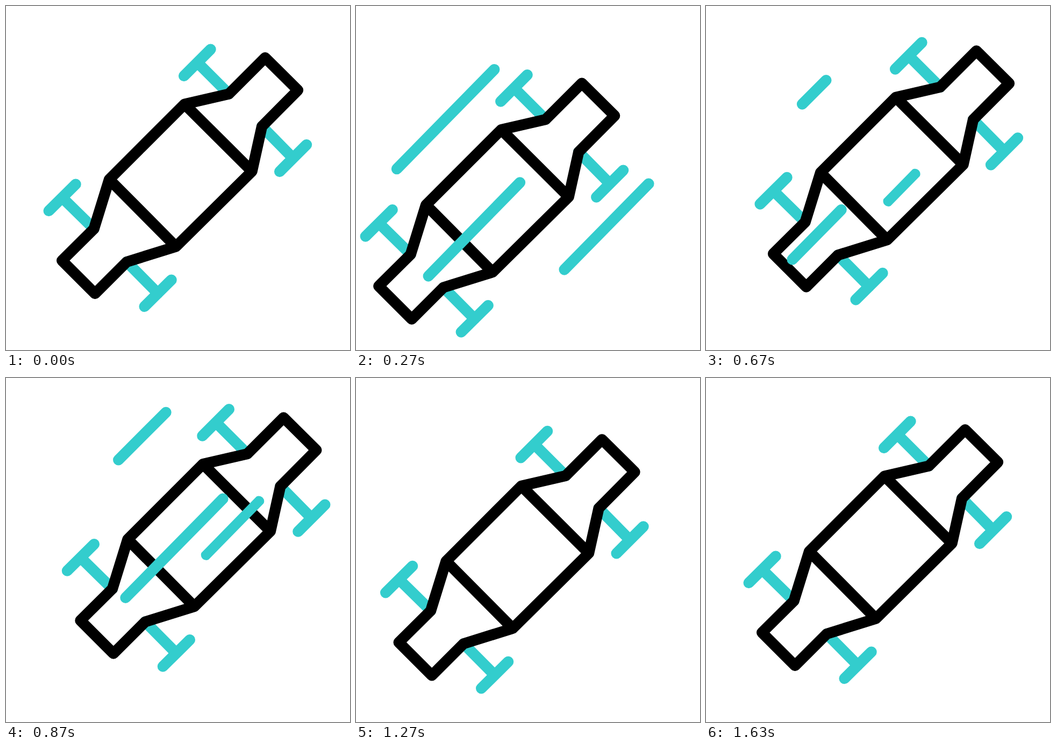
Recreate the animation shown at these times as an HTML page. Size 640 by 640 pixels, loop 1670 ms.

```html
<!DOCTYPE html>
<html lang="en">
<head>
<meta charset="utf-8">
<title>Racing car loop</title>
<style>
  html, body { margin: 0; width: 100%; height: 100%; overflow: hidden; background: #fff; }
  svg { display: block; width: 100%; height: 100%; }
  path, line { fill: none; stroke-width: 20.3; stroke-linecap: round; stroke-linejoin: round; }
  .teal, line { stroke: #33cdcd; }
  .black { stroke: #000; }
</style>
</head>
<body>
<svg viewBox="0.4 0.4 640 640">
  <defs>
    <clipPath id="band">
      <rect x="300" y="354" width="280" height="18.4" transform="rotate(-45.6 340 363.2)"/>
    </clipPath>
  </defs>
  <g id="car">
    <path class="teal" d="M381 81L331.5 130.5M356.5 105.5L415 164
      M559.5 258.5L509.5 308.5M534.5 283.5L476.5 224.5
      M130 332L80 381.5M105 357L164 415
      M308 510L258 559.5M283 535L225 476.5"/>
    <path class="black" d="M482.5 96.5L543.5 157L476.5 224.5L458 308L316.5 448L225 476.5
      L166 535.5L104.5 474L164 415L192.5 323L332.5 183L415 164Z
      M332.5 183L458 308M192.5 323L316.5 448"/>
  </g>
  <g id="streaks"></g>
</svg>
<script>
  const LOOP = 1670, STEP = 100 / 3;   // ms
  const car = document.getElementById('car');
  const layer = document.getElementById('streaks');

  // Car offset keys: [step, x, y]
  const carKeys = [
    [0, 0, 0], [9.1, -64.5, 49.5], [9.4, -64.5, 49.5],
    [23.7, 38, -25], [24.2, 38, -25], [36.5, -25.5, 19], [49, 0, 0]
  ];

  // The tip of a streak runs along its line first; the tail follows later.
  const RUN = 11.8, TAIL_DELAY = 7;
  const streaks = [
    { start: 0, from: [71.3, 308.7], to: [318, 57] },
    { start: 0, from: [130.4, 507.7], to: [362, 271] },
    { start: 0, from: [383.7, 495.3], to: [597, 278] },
    { start: 15.15, from: [179.4, 183], to: [300.2, 62] },
    { start: 15.15, from: [161, 472], to: [408.5, 220.5] },
    { start: 15.15, from: [340, 363.2], to: [473, 227.5], clip: 'url(#band)' }
  ];

  for (const s of streaks) {
    s.line = document.createElementNS('http://www.w3.org/2000/svg', 'line');
    if (s.clip) {
      const group = document.createElementNS('http://www.w3.org/2000/svg', 'g');
      group.setAttribute('clip-path', s.clip);
      group.append(s.line);
      layer.append(group);
    } else {
      layer.append(s.line);
    }
  }

  const mix = (a, b, k) => a + (b - a) * k;
  const ease = u => {
    const k = Math.min(1, Math.max(0, u));
    return k * k * (3 - 2 * k);
  };

  function moveCar(step) {
    const i = Math.max(1, carKeys.findIndex(key => key[0] >= step));
    const [t0, x0, y0] = carKeys[i - 1], [t1, x1, y1] = carKeys[i];
    const k = ease((step - t0) / (t1 - t0));
    car.setAttribute('transform', `translate(${mix(x0, x1, k)} ${mix(y0, y1, k)})`);
  }

  function drawStreak({ line, start, from, to }, step) {
    const age = step - start;
    const visible = age > 0 && age < TAIL_DELAY + RUN;
    line.style.display = visible ? '' : 'none';
    if (!visible) return;
    const tail = ease((age - TAIL_DELAY) / RUN), tip = ease(age / RUN);
    line.setAttribute('x1', mix(from[0], to[0], tail));
    line.setAttribute('y1', mix(from[1], to[1], tail));
    line.setAttribute('x2', mix(from[0], to[0], tip));
    line.setAttribute('y2', mix(from[1], to[1], tip));
  }

  const begin = performance.now();
  function render() {
    const time = (performance.now() - begin) % LOOP;
    const step = Math.min(49, Math.floor((time + 4) / STEP));
    moveCar(step);
    for (const s of streaks) drawStreak(s, step);
    requestAnimationFrame(render);
  }
  render();
</script>
</body>
</html>
```
